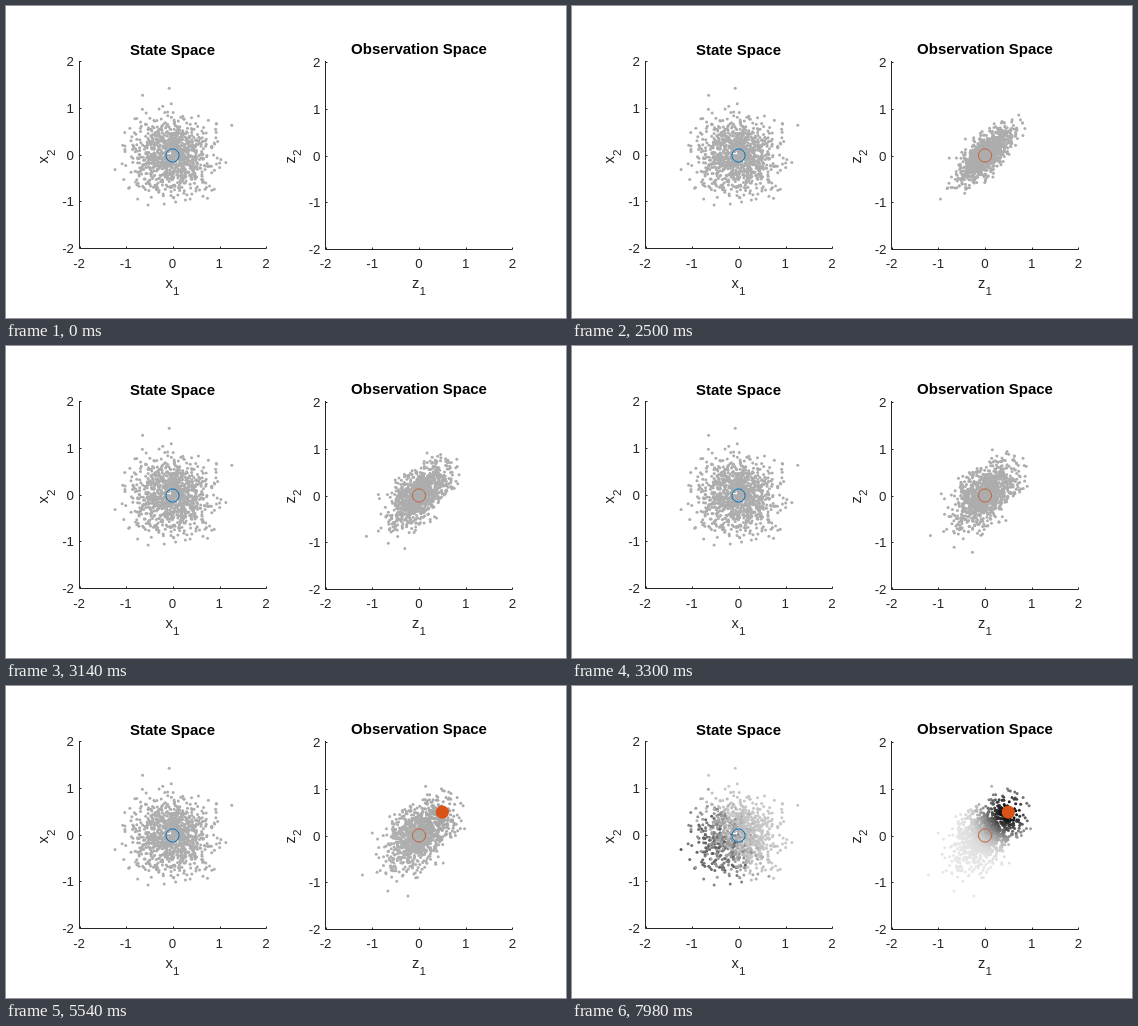
An HTML page with a canvas for the animation above (8 s loop, 560 by 312 pixels).

```html
<!DOCTYPE html>
<html lang="en">
<head>
<meta charset="utf-8">
<title>State and observation space</title>
<style>
html, body { margin: 0; width: 100%; height: 100%; overflow: hidden; background: #fff; }
canvas { display: block; }
</style>
</head>
<body>
<canvas id="stage" width="560" height="312"></canvas>
<script>
const ctx = document.getElementById('stage').getContext('2d');
const FONT = '"Liberation Sans", Arial, sans-serif';
const LOOP = 8000, STEP = 40, STEPS = 25;
const UNIT = 46.7, MID_Y = 149.5, STATE_X = 166.5, OBS_X = 413;
const INK = '#262626', BLUE = '#0072bd', ORANGE = '#d95319', RUST = '#c0623a';
const GREY = 173, PALE = 230;
const TARGET = 0.5, KERNEL = 0.38;

function random(seed) {
  return () => {
    seed = (seed + 0x6d2b79f5) | 0;
    let t = Math.imul(seed ^ (seed >>> 15), 1 | seed);
    t = (t + Math.imul(t ^ (t >>> 7), 61 | t)) ^ t;
    return ((t ^ (t >>> 14)) >>> 0) / 4294967296;
  };
}
const rand = random(42);

// Gaussian pair, cut off beyond `limit` deviations
function gauss(sd, limit) {
  let r;
  do r = Math.sqrt(-2 * Math.log(1 - rand())); while (r > limit);
  const a = 2 * Math.PI * rand();
  return [sd * r * Math.cos(a), sd * r * Math.sin(a)];
}

// The farthest states are fixed, the rest are drawn at random
const rim = [[1.27, 0.65], [-1.23, -0.3], [-0.07, 1.44], [-0.64, 1.29]];

const samples = Array.from({ length: 1000 }, (_, i) => {
  const x = rim[i] || gauss(0.4, 3);
  const noise = gauss(0.21, 2.8);
  const z = [-0.46 * x[0] - 0.55 * x[1], -0.7 * x[0] - 0.07 * x[1]];
  const d = Math.hypot(z[0] + noise[0] - TARGET, z[1] + noise[1] - TARGET);
  const weight = Math.exp(-d * d / (2 * KERNEL * KERNEL));
  return { x, z, noise, shade: PALE * (1 - weight) };
});

// Fraction of a stepped linear transition that begins at `start`
function progress(t, start) {
  const step = Math.floor((t - start) / STEP) + 1;
  return Math.max(0, Math.min(STEPS, step)) / STEPS;
}

function disc(cx, u, v, r) {
  ctx.beginPath();
  ctx.arc(cx + u * UNIT, MID_Y - v * UNIT, r, 0, 2 * Math.PI);
}

function dot(cx, u, v, shade, mix) {
  const g = Math.round(GREY + (shade - GREY) * mix);
  ctx.fillStyle = `rgb(${g},${g},${g})`;
  disc(cx, u, v, 1.5);
  ctx.fill();
}

function ring(cx, color) {
  ctx.strokeStyle = color;
  ctx.lineWidth = 1;
  disc(cx, 0, 0, 6.6);
  ctx.stroke();
}

function text(str, x, y, size, align, weight = '') {
  ctx.font = `${weight} ${size}px ${FONT}`;
  ctx.textAlign = align;
  ctx.fillText(str, x, y);
}

function label(name, sub, x, y) {
  text(name, x, y, 14.67, 'left');
  text(sub, x + 7.4, y + 6.5, 11.7, 'left');
}

function axes(cx, left, bottom, title, titleY, name) {
  ctx.strokeStyle = ctx.fillStyle = INK;
  ctx.lineWidth = 1;
  ctx.beginPath();
  ctx.moveTo(left, 55);
  ctx.lineTo(left, bottom);
  ctx.lineTo(left + 187, bottom);
  for (let v = -2; v <= 2; v++) {
    const x = Math.round(left + (v + 2) * UNIT) + 0.5;
    const y = Math.floor(bottom - (v + 2) * UNIT) + 0.5;
    ctx.moveTo(x, bottom);
    ctx.lineTo(x, bottom - 2);
    ctx.moveTo(left, y);
    ctx.lineTo(left + 2, y);
    text(v, cx + v * UNIT, 262, 13.33, 'center');
    text(v, cx - 98.5, Math.round(bottom - (v + 2) * UNIT + 4.6), 13.33, 'right');
  }
  ctx.stroke();
  label(name, '1', cx - 7, 282);
  ctx.save();
  ctx.translate(cx - 124.5, 157.5);
  ctx.rotate(-Math.PI / 2);
  label(name, '2', 0, 0);
  ctx.restore();
  ctx.fillStyle = '#000';
  text(title, cx, titleY, 15, 'center', 'bold');
}

function draw(t) {
  const spread = progress(t, 2500), fadeZ = progress(t, 5540), fadeX = progress(t, 7540);
  ctx.fillStyle = '#fff';
  ctx.fillRect(0, 0, 560, 312);
  axes(STATE_X, 73.5, 242.5, 'State Space', 49, 'x');
  axes(OBS_X, 319.5, 243.5, 'Observation Space', 48, 'z');
  for (const { x, z, noise, shade } of samples) {
    dot(STATE_X, x[0], x[1], shade, fadeX);
    if (t >= 1500) dot(OBS_X, z[0] + spread * noise[0], z[1] + spread * noise[1], shade, fadeZ);
  }
  ring(STATE_X, BLUE);
  if (t >= 500) ring(OBS_X, t >= 1500 ? RUST : ORANGE);
  if (t >= 4500) {
    ctx.fillStyle = ORANGE;
    disc(OBS_X, TARGET, TARGET, 6.6);
    ctx.fill();
  }
}

function tick() {
  draw(performance.now() % LOOP);
  requestAnimationFrame(tick);
}
tick();
</script>
</body>
</html>
```
